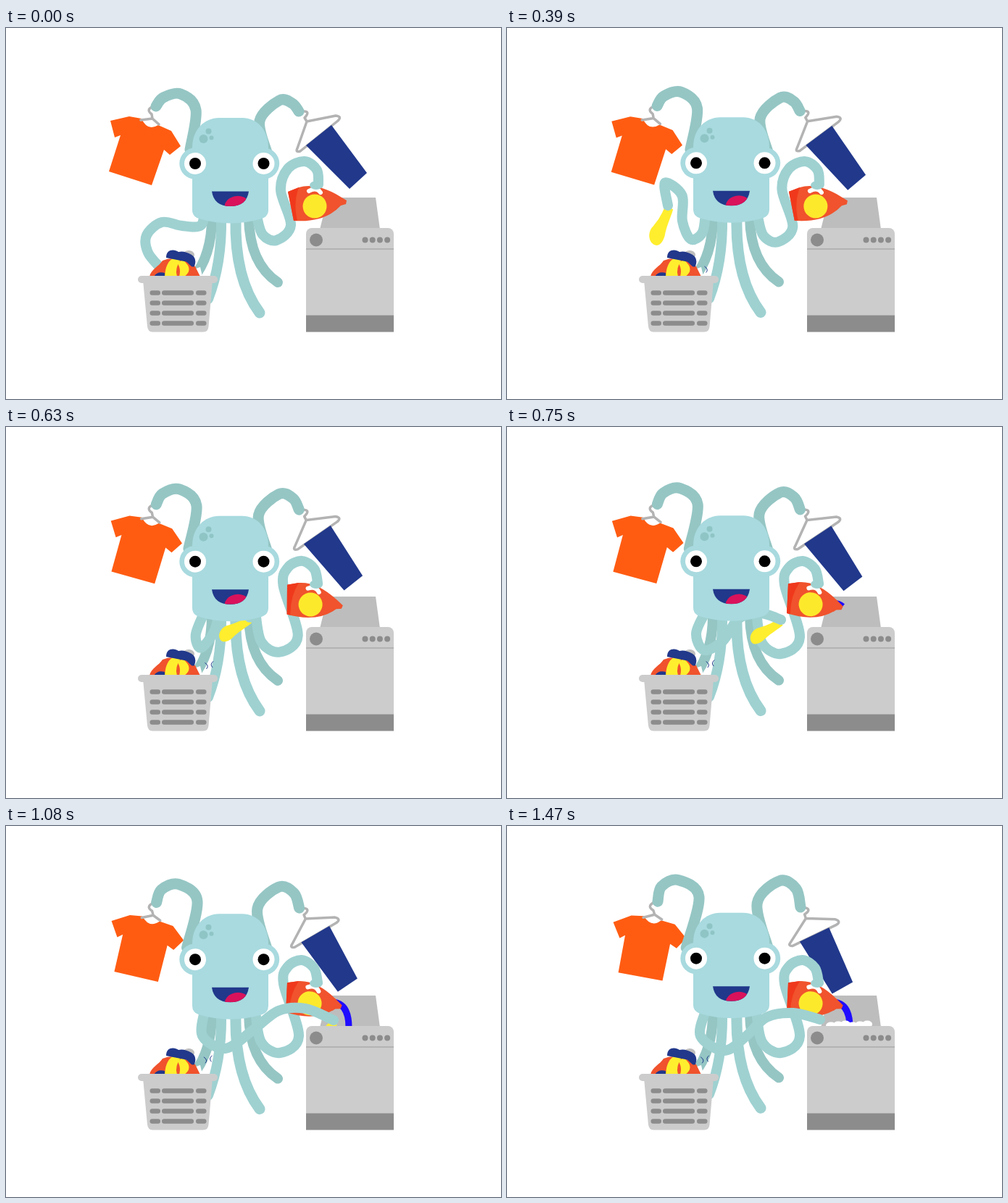
Write an HTML page that moves like this. It is 683 px wide and 512 px high and loops after 1500 ms.

```html
<!DOCTYPE html>
<html lang="en">
<head>
<meta charset="utf-8">
<title>Laundry octopus</title>
<style>
html, body { margin: 0; width: 100%; height: 100%; overflow: hidden; background: #fff; }
svg { display: block; width: 100vw; height: 100vh; }
</style>
</head>
<body>
<svg id="stage" viewBox="0 0 683 512"></svg>
<script>
const LOOP = 1500, STEP = 30;
const SKIN = '#a8dadf', LIMB = '#9fd1d1', SHADE = '#95c6c4', SPOT = '#8fc5c5';
const NAVY = '#21388b', YELLOW = '#ffee2e', RED = '#f0532d';
const GREY = '#cccccc', DARK = '#8c8c8c', WIRE = '#b3b3b3';

const stage = document.getElementById('stage');
const clamp = x => Math.min(1, Math.max(0, x));
const lerp = (a, b, k) => a + (b - a) * k;
const blend = (a, b, k) => a.map((x, i) => lerp(x, b[i], k));
const ramp = (t, a, b) => { const x = clamp((t - a) / (b - a)); return x * x * (3 - 2 * x); };

const fill = (d, color) => `<path d="${d}" fill="${color}"/>`;
const line = (d, color, w) =>
  `<path d="${d}" fill="none" stroke="${color}" stroke-width="${w}" stroke-linecap="round" stroke-linejoin="round"/>`;
const dot = (x, y, r, color) => `<circle cx="${x}" cy="${y}" r="${r}" fill="${color}"/>`;
const oval = (x, y, rx, ry, color) => `<ellipse cx="${x}" cy="${y}" rx="${rx}" ry="${ry}" fill="${color}"/>`;
const rect = (x, y, w, h, r, color) => `<rect x="${x}" y="${y}" width="${w}" height="${h}" rx="${r}" fill="${color}"/>`;
const group = (transform, s) => `<g transform="${transform}">${s}</g>`;

// Smooth curve through a flat list of coordinates
function spline(flat) {
  const p = [];
  for (let i = 0; i < flat.length; i += 2) p.push([flat[i], flat[i + 1]]);
  let d = `M${p[0]}`;
  for (let i = 0; i < p.length - 1; i++) {
    const a = p[i], b = p[i + 1], pre = p[i - 1] || a, post = p[i + 2] || b;
    const c = a.map((x, j) => x + (b[j] - pre[j]) / 6);
    const e = b.map((x, j) => x - (post[j] - a[j]) / 6);
    d += `C${c} ${e} ${b}`;
  }
  return d;
}

// Reaching arm: six points after the shoulder at a few times
const reach = [
  { t: 0, turn: 0, pts: [268,273, 243,273, 215,268, 194,286, 196,310, 214,332] },
  { t: 270, turn: 0, pts: [272,280, 252,288, 233,258, 226,217, 198,203, 185,240] },
  { t: 510, turn: 65, pts: [267,285, 255,295, 251,275, 257,245, 238,224, 259,250] },
  { t: 600, turn: 67, pts: [262,287, 268,304, 284,280, 291,250, 308,238, 326,262] },
  { t: 750, turn: 67, pts: [261,285, 272,308, 298,295, 320,264, 350,257, 378,266] },
  { t: 960, turn: 85, pts: [267,290, 300,312, 335,288, 368,262, 402,259, 430,268] },
  { t: 1215, turn: 10, pts: [276,290, 308,301, 350,272, 385,247, 425,244, 477,268] },
  { t: 1470, turn: 0, pts: [267,290, 300,310, 330,290, 358,264, 395,258, 432,267] }
];

function reachAt(t) {
  const i = Math.max(1, reach.findIndex(r => r.t >= t));
  const a = reach[i - 1], b = reach[i], k = (t - a.t) / (b.t - a.t);
  return {
    turn: lerp(a.turn, b.turn, k),
    size: lerp(1, .8, ramp(t, 270, 510)),
    pts: blend(a.pts, b.pts, k)
  };
}

function shirt(k) {
  return group(`translate(${.7 * k} ${-2.5 * k}) rotate(${-7.6 * k} 200 117)`,
    fill('M144 128L170 122L187 125Q195 143 210 134L228 142L241 163L226 175L218 168L201 217L142 198L158 148L150 151Z', '#ff5c12') +
    line('M204 108Q192 112 201 119L202 125M186 127L202 125L211 133', WIRE, 3.5));
}

function skirt(k) {
  return group(`translate(${-k} ${-2 * k}) rotate(${13.5 * k} 412 122)`,
    line('M409 115Q421 114 412 124L415 129L455 121Q464 122 458 128L406 170Q399 172 402 166L415 129', WIRE, 3.5) +
    fill('M449 134L498 200L474 222L414 162Z', NAVY));
}

function upperArms(k) {
  const left = blend([207,108, 217,96, 241,91, 262,113, 254,168],
                     [208,104, 213,83, 236,74, 265,97, 247,168], k);
  const right = blend([404,115, 395,104, 377,100, 350,128, 360,172],
                      [405,112, 399,86, 376,75, 345,106, 360,168], k);
  return line(spline(left), SHADE, 15) + line(spline(right), SHADE, 15);
}

function lid(t) {
  const pour = clamp((t - 690) / 210), foam = ramp(t, 1200, 1440);
  let s = fill('M444 234H510L516 278H433Z', '#bdbdbd');
  if (pour > 0)
    s += `<path d="M451 243Q473 245 473 278" fill="none" stroke="#1f0cff" stroke-width="9" pathLength="1" stroke-dasharray="${pour} 2"/>`;
  if (foam > 0)
    for (let i = 0; i < 6; i++) s += oval(447 + i * 10, 281 - foam * (5.5 + i % 3), 7, 5, '#fff');
  return s;
}

function washer() {
  let s = rect(414, 276, 121, 40, 8, GREY) + rect(414, 290, 121, 107, 0, GREY) +
    rect(414, 304, 121, 2, 0, WIRE) + rect(414, 396.5, 121, 23, 0, DARK) + dot(428, 292.5, 9, DARK);
  for (let i = 0; i < 4; i++) s += dot(495.5 + i * 10.2, 292.5, 4, DARK);
  return s;
}

function legs(k) {
  return group(`translate(0 ${-3.8 * k})`,
    line('M284 262Q284 315 257 347', SHADE, 14) +
    line('M335 262Q336 325 375 351', SHADE, 14) +
    line('M297 262Q298 325 279 374', LIMB, 14) +
    line('M317 262Q315 346 350 393', LIMB, 15));
}

function bottle(t) {
  const arm = blend(
    [346,260, 354,285, 373,293, 393,272, 379,224, 389,194, 412,184, 429,196, 431,216],
    [344,256, 352,298, 378,313, 404,290, 383,218, 389,194, 408,185, 425,196, 430,216],
    ramp(t, 300, 720));
  return line(spline(arm), LIMB, 14) +
    group(`rotate(${14 * ramp(t, 360, 720)} 428 217)`,
      fill('M389 226L404 220Q428 213 460 232L470 238L469 243L462 245Q440 269 397 266Z', RED) +
      fill('M389 226L404 220Q396 242 402 266L397 266Z', '#f0391c') +
      dot(426, 246, 16.5, '#fde92b') +
      line('M418 225Q428 219 434 227', '#fff', 6)) +
    oval(428, 217, 9, 6, LIMB);
}

function sock(r) {
  const [x, y] = r.pts.slice(-2);
  return group(`translate(${x} ${y}) rotate(${r.turn}) scale(${r.size})`,
    fill('M-4 0L10 1C14 15 15 28 21 42C25 56 20 63 12 62C3 61 -5 50 -2 38Q1 19 -4 0Z', YELLOW));
}

function head(t, k) {
  const shut = t >= 1170 && t < 1320;
  let s = fill('M257 165C257 140 274 124 294 124H326C346 124 362 140 362 165V251Q362 260 353 263Q310 276 266 263Q257 260 257 251Z', SKIN) +
    dot(272.5, 153, 6, SPOT) + dot(279.5, 142.5, 4, SPOT) + dot(283.5, 151.5, 3, SPOT);
  for (const x of [261, 355.5]) {
    s += dot(x, 187, 21.7, SKIN);
    s += shut ? rect(x - 14, 185, 27, 4, 2, '#000') : dot(x, 187, 15, '#fff') + dot(x, 187, 8, '#000');
  }
  const mouth = 'M284 225.5H335Q332 246 309.5 246Q287 246 284 225.5Z';
  s += `<clipPath id="mouth"><path d="${mouth}"/></clipPath>` + fill(mouth, NAVY) +
    `<g clip-path="url(#mouth)">${group('rotate(-12 318 244)', oval(318, 244 + 1.5 * k, 16.5, 12, '#d9125b'))}</g>`;
  return group(`translate(0 ${-4.5 * k})`, s);
}

function basket(t) {
  const sway = 8 * Math.sin(t / LOOP * Math.PI) - 4;
  const wrinkles = t < 120 ? '' : group(`translate(${sway} ${-12 * clamp((t - 270) / 800)})`,
    line('M271 331Q277 335 273 339', NAVY, 1) + (t > 390 ? line('M282 329Q277 333 281 337', NAVY, 1) : ''));
  let s = fill('M256 334L268 330L271 343H258Z', '#fff') + wrinkles +
    oval(252, 313, 8, 6, '#bdbdbd') +
    fill('M198 343C200 333 211 329 216 321Q236 312 261 329L268 343Z', RED) +
    fill('M219 343Q220 324 230 318H242Q232 332 236 343Z', YELLOW) +
    fill('M239 343Q242 332 236 324L244 320Q260 333 246 343Z', YELLOW) +
    fill('M221 317C221 305 232 305 238 309Q246 307 256 313Q264 318 260 329C255 332 252 322 246 322Q236 320 221 317Z', NAVY) +
    fill('M204 343Q209 335 219 338V343Z', NAVY) +
    rect(182, 342, 110, 10, 5, GREY) +
    fill('M189 348H285L279.5 412Q279 419.5 272 419.5H202Q196 419.5 195 412Z', GREY);
  for (let i = 0; i < 4; i++)
    for (const [x, w] of [[198.5, 14.5], [215, 44], [262, 14.5]])
      s += rect(x, 362.3 + i * 14, w, 6.5, 3.2, DARK);
  return s;
}

function draw(t) {
  const k = Math.pow(t / LOOP, 1.4);
  const r = reachAt(t);
  const dropping = t > 1050;
  stage.innerHTML = [
    shirt(k), skirt(k), upperArms(k), lid(t),
    dropping && t < 1230 ? sock(r) : '',
    washer(), legs(k), bottle(t),
    dropping ? '' : sock(r),
    line(spline([274, 255, ...r.pts]), LIMB, 14),
    head(t, k), basket(t)
  ].join('');
}

const start = performance.now();
function tick() {
  const t = (performance.now() - start) % LOOP;
  draw(Math.floor(t / STEP) * STEP);
  requestAnimationFrame(tick);
}
tick();
</script>
</body>
</html>
```
